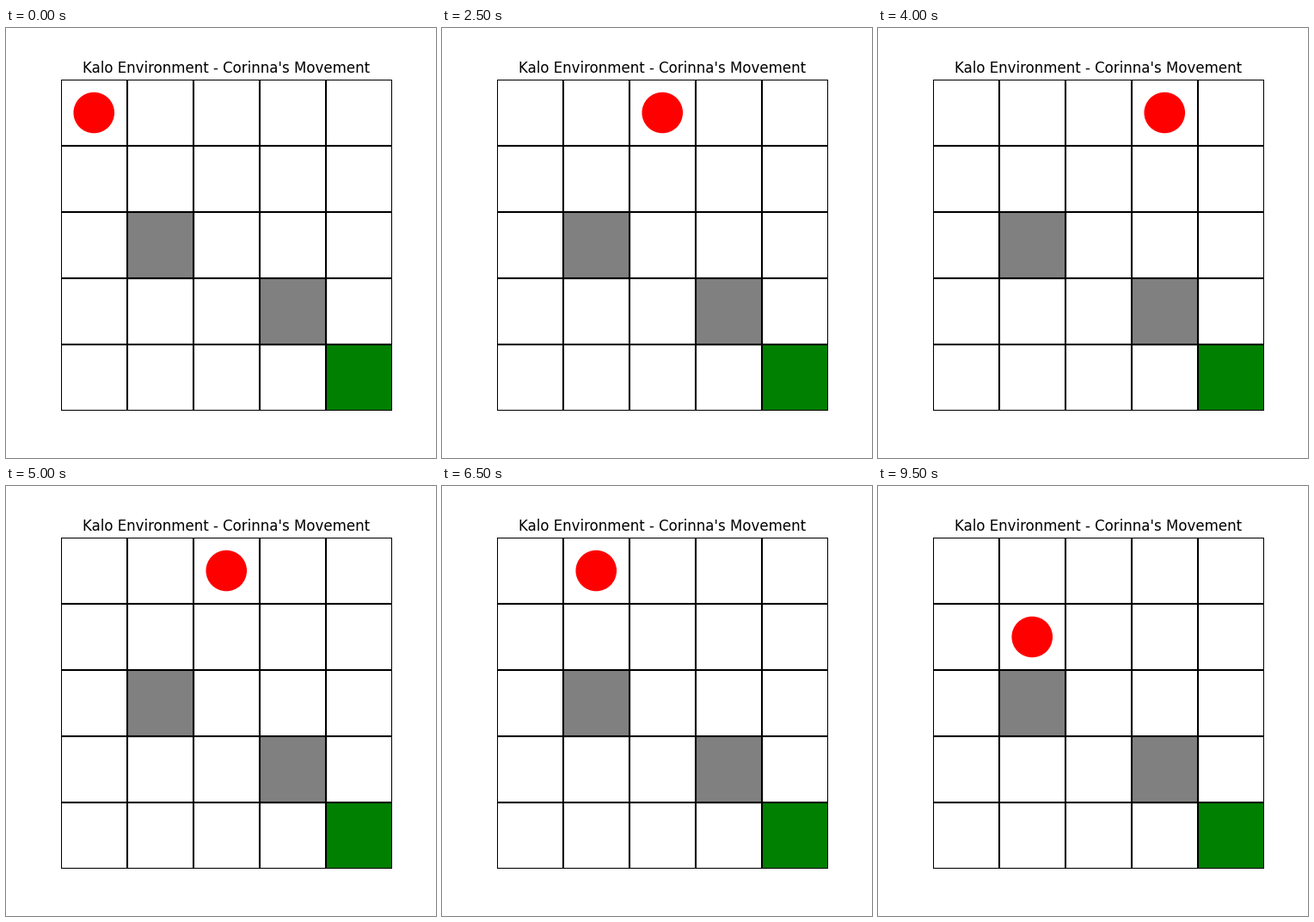
Write a matplotlib script that moves like this. It is 500 by 500 pixels and loops after 10 s.

```python
import matplotlib.pyplot as plt
from matplotlib.animation import FuncAnimation
from matplotlib.patches import Circle, Rectangle

plt.rcParams["font.family"] = "DejaVu Sans"

SIZE = 5
OBSTACLES = [(1, 2), (3, 3)]
GOAL = (4, 4)
STEP_MS = 500

# Cell (column, row) of the agent at each step.
PATH = [(col, 0) for col in (0, 0, 1, 2, 1, 2, 1, 2, 3, 3, 2, 3, 2, 1)]
PATH += [(col, 1) for col in (1, 0, 0, 0, 0, 1)]

fig, ax = plt.subplots(figsize=(5, 5), dpi=100)
ax.set_xlim(0, SIZE)
ax.set_ylim(SIZE, 0)
ax.set_aspect("equal")
ax.axis("off")
ax.set_title("Kalo Environment - Corinna's Movement")


def fill_cell(cell, color):
    ax.add_patch(Rectangle(cell, 1, 1, color=color))


for obstacle in OBSTACLES:
    fill_cell(obstacle, "gray")
fill_cell(GOAL, "green")

for i in range(SIZE + 1):
    ax.plot([0, SIZE], [i, i], color="black", linewidth=1.5)
    ax.plot([i, i], [0, SIZE], color="black", linewidth=1.5)

agent = ax.add_patch(Circle((0.5, 0.5), 0.3, color="red"))


def update(step):
    col, row = PATH[step]
    agent.center = (col + 0.5, row + 0.5)
    return [agent]


anim = FuncAnimation(fig, update, frames=len(PATH), interval=STEP_MS,
                     repeat=True, repeat_delay=0)
plt.show()
```
